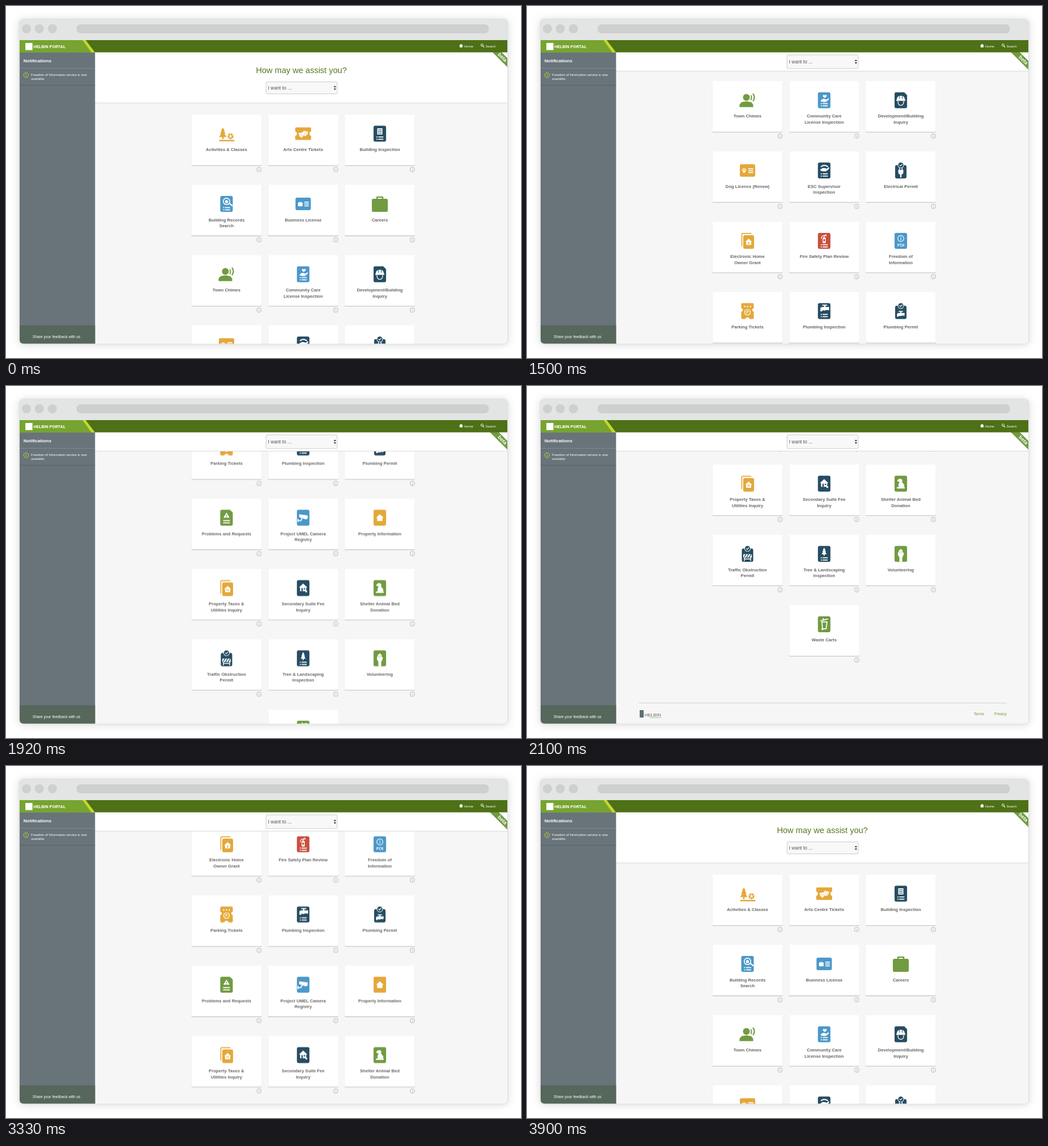
An HTML page that plays this animation: 905 by 619 pixels, repeating every 5.4 s.

```html
<!DOCTYPE html>
<html lang="en">
<head>
<meta charset="utf-8">
<title>Service portal</title>
<style>
  html, body { margin: 0; width: 100%; height: 100%; overflow: hidden; background: #fff; }
  svg { display: block; width: 905px; height: 619px; }
  text { font-family: "Liberation Sans", Arial, sans-serif; }
  .label { font-size: 7.65px; font-weight: bold; fill: #666; text-anchor: middle; }
  .window { filter: drop-shadow(0 1px 7px rgba(0, 0, 0, .13)); }
</style>
</head>
<body>
<svg id="stage" viewBox="0 0 905 619" xmlns="http://www.w3.org/2000/svg"></svg>
<script>
const YELLOW = '#e4a83a', NAVY = '#264d62', BLUE = '#4b98c9', GREEN = '#719b41', RED = '#c94f3e', WHITE = '#fff';

const rect = (x, y, w, h, fill, r = 0, more = '') =>
  `<rect x="${x}" y="${y}" width="${w}" height="${h}" rx="${r}" fill="${fill}" ${more}/>`;
const disc = (x, y, r, fill = WHITE) => `<circle cx="${x}" cy="${y}" r="${r}" fill="${fill}"/>`;
const ring = (x, y, r, color = WHITE, w = 1) =>
  `<circle cx="${x}" cy="${y}" r="${r}" fill="none" stroke="${color}" stroke-width="${w}"/>`;
const shape = (d, fill = WHITE) => `<path d="${d}" fill="${fill}"/>`;
const line = (d, w = 1, color = WHITE) =>
  `<path d="${d}" fill="none" stroke="${color}" stroke-width="${w}" stroke-linecap="round" stroke-linejoin="round"/>`;
const text = (x, y, size, fill, str, more = '') =>
  `<text x="${x}" y="${y}" font-size="${size}" fill="${fill}" ${more}>${str}</text>`;
const group = (x, y, body, scale = 1) => `<g transform="translate(${x} ${y}) scale(${scale})">${body}</g>`;

// Icon parts, centred on 0,0
const doc = c => rect(-11, -14, 22, 28, c, 3);
const cutDoc = c => shape('M-8-14H6L11-9V11Q11 14 8 14H-8Q-11 14-11 11V-11Q-11-14-8-14Z', c);
const wideDoc = c => rect(-13.5, -11, 27, 22, c, 3);
const doubleDoc = c => line('M-10 9V-11Q-10-13-8-13H6', 1.7, c) + rect(-7.5, -10, 19, 24, c, 3);
const clipboard = c => rect(-10, -9.5, 20, 23.5, c, 3) + disc(0, -9.5, 5.5, WHITE) +
  disc(0, -9.5, 4.6, c) + line('M-2-9.5L-.5-8L2.3-11', 1.2);
const list = (y = 6) => [y, y + 4].map(v => rect(-6, v, 2, 1.7, WHITE) + rect(-2.7, v, 9, 1.7, WHITE)).join('');
const house = (x, y, s = 1, mark = '') =>
  group(x, y, shape('M0-6.5L7 0H5V6H-5V0H-7Z') + mark, s);
const tree = c => shape('M0-11L3.5-5H2L5 0H3L6.5 6H1.3V10H-1.3V6H-6.5L-3 0H-5L-2-5H-3.5Z', c);
const hand = shape('M-7 1L-3-1.5L1-1L3 0L7-3V0L2 4H-3L-7 3Z');
const tap = shape('M-7 4V0Q-7-3-3.5-3H-1V-5H-4V-6.5H4V-5H1V-3H7V2H1.5Q0 3.5-2 2.5H-4V4Z');
const paw = disc(0, 1.5, 2) + disc(-2.6, -.8, 1) + disc(-.9, -2.3, 1) + disc(1.2, -2.3, 1) + disc(2.7, -.5, 1);
const briefcase = c => rect(-14, -9, 28, 23, c, 2.5) + line('M-5-9V-12H5V-9', 2.4, c);
const mask = c => shape('M-4-3.5Q0-1.5 4-3.5V1Q3 5 0 6Q-3 5-4 1Z') + disc(-1.7, .2, .7, c) +
  disc(1.7, .2, .7, c) + line('M-1.5 3Q0 4 1.5 3', .6, c);

const icons = {
  outing: group(-6.5, 0, tree(YELLOW), .98) + rect(-13, 11, 27, 2.5, YELLOW, 1) + disc(7, 4.5, 5.2, YELLOW) +
    shape('M7 2.4L9 4L8 6.3H6L5 4Z') + line('M7 2.4V0M9 4L11.5 3M5 4L2.7 3M8 6.3L9.5 8.5M6 6.3L4.5 8.5', .9),
  theatre: shape('M-12-11H12Q14-11 14-9V-4Q11-3 11 0Q11 3 14 4V9Q14 11 12 11H-12Q-14 11-14 9V4Q-11 3-11 0Q-11-3-14-4V-9Q-14-11-12-11Z', YELLOW) +
    `<g transform="translate(4 -1.5) rotate(12)">${mask(YELLOW)}</g><g transform="translate(-3.5 1) rotate(-10)">${mask(YELLOW)}</g>`,
  building: doc(NAVY) + rect(-4.5, -9.5, 9, 11, WHITE) +
    [-7.7, -4.7, -1.7].map(y => [-3, -.8, 1.4].map(x => rect(x, y, 1.5, 1.6, NAVY)).join('')).join('') + list(5),
  records: doc(BLUE) + line('M5-1L10 3', 2.4) + disc(0, -4.5, 6.5) + disc(0, -4.5, 4.9, BLUE) + house(0, -4.5, .48) + list(5.5),
  business: wideDoc(BLUE) + group(-5, 0, briefcase(WHITE), .29) + [-4, -.7, 2.6].map(y => rect(2, y, 8, 1.7, WHITE)).join(''),
  careers: briefcase(GREEN),
  voices: disc(-2, -5, 6, GREEN) + shape('M-14 12V8Q-12 2-2 2Q8 2 10 8V12Z', GREEN) +
    line('M6-8Q8-5 6-1', 2, GREEN) + line('M10-11Q14-5 10 1', 2.2, GREEN),
  care: doc(BLUE) + group(1, -1, hand) + shape('M1-4Q-4-7-1.5-9Q0-10 1-8Q2-10 4-9Q6-7 1-4Z') + list(5),
  helmet: cutDoc(NAVY) + shape('M-7-1Q-7-8 0-8Q7-8 7-1H8V1H-8V-1Z') + line('M-2.5-7V-3M2.5-7V-3', 1, NAVY) +
    line('M-5 2Q-5 9 0 9Q5 9 5 2', 1.3),
  dog: wideDoc(YELLOW) + group(-6, 0, paw, 1.15) + [-4, -.7, 2.6].map(y => rect(1.5, y, 8.5, 1.7, WHITE)).join(''),
  supervisor: doc(NAVY) + group(1, -3, hand, 1.1) + line('M-5-7Q0-11 6-7', 2) + list(5),
  plug: clipboard(NAVY) + shape('M-4.5-1H4.5V3Q4 7 1.2 7V12H-1.2V7Q-4 7-4.5 3Z') + line('M-2.3-1V-3.5M2.3-1V-3.5', 1.6),
  grant: doubleDoc(YELLOW) + house(2, 2, .88, text(0, 4.5, 7, YELLOW, '$', 'text-anchor="middle" font-weight="bold"')),
  fire: doc(RED) + rect(-2.7, -6, 5.5, 10, WHITE, 1.5) + rect(-1.4, -3, 2.8, 4, RED) +
    line('M-5-4Q-5-9 0-9H4M0-9V-6M0-9L3-11', 1.2) + list(6),
  foi: doc(BLUE) + ring(0, -4, 5.3, WHITE, 1.2) + disc(0, -6.3, .8) + rect(-.6, -4.7, 1.2, 3.7, WHITE) +
    text(0, 10, 7.5, WHITE, 'FOI', 'text-anchor="middle" font-weight="bold"'),
  parking: shape('M-9-14H9Q11-14 11-12V-5Q8-4 8-2Q8 0 11 1V12Q11 14 9 14H4Q3 11 0 11Q-3 11-4 14H-9Q-11 14-11 12V1Q-8 0-8-2Q-8-4-11-5V-12Q-11-14-9-14Z', YELLOW) +
    [-5, 0, 5].map(x => disc(x, -8, 1.2)).join('') + ring(0, 2, 5, WHITE, 1.2) +
    text(0, 4.5, 6.5, WHITE, 'P', 'text-anchor="middle" font-weight="bold"'),
  tapList: doc(NAVY) + group(1, -4, tap, 1.1) + list(5),
  tapPermit: clipboard(NAVY) + group(0, 6, tap, .95),
  problem: cutDoc(GREEN) + shape('M0-9L5.5 0H-5.5Z') + rect(-.6, -5.8, 1.2, 3, GREEN) + disc(0, -1.4, .7, GREEN) +
    rect(-6, 4, 12, 1.8, WHITE) + rect(-6, 8, 12, 1.8, WHITE),
  camera: doc(BLUE) + shape('M-7-6L8-4V1L5 3L-7-1Z') + line('M-2 1L-4 5H-9', 1.8) + rect(-10, 2, 1.8, 5.5, WHITE),
  property: doc(YELLOW) + house(0, 0, .95),
  taxes: doubleDoc(YELLOW) + house(2, 2, .88, text(0, 4, 5.5, YELLOW, '%', 'text-anchor="middle" font-weight="bold"')),
  suite: doc(NAVY) + house(0, -1, 1.08, rect(-2.8, 1, 2.2, 5, NAVY) + rect(1, 1, 2.2, 2.2, NAVY)) + rect(4, 4.5, 3, 3, WHITE),
  shelter: doc(GREEN) + shape('M-4-8L0-9L3-6L2-3L6 2V6H-4V1L-2-3L-6-4V-6Z') + rect(-7, 6, 14, 2.5, WHITE, 1),
  barrier: clipboard(NAVY) + rect(-7.5, .5, 15, 6, WHITE, 1) + line('M-6 6L-3 1M-1.5 6L1.5 1M3 6L6 1', 1.4, NAVY) +
    line('M-5.5 6V12M5.5 6V12M-5.5 9H5.5', 1.4),
  landscape: doc(NAVY) + group(0, -3.5, tree(WHITE), .68) + list(6),
  volunteer: doc(GREEN) + shape('M-5 2V-3H-3.6V-6.5H-1.5V-8.5H.8V-7H3V-3L5.5-1.5L4 4L2.5 6V14H-2.5V6Z') +
    line('M-2-4V-1M.5-5V-1', .5, GREEN),
  cart: doc(GREEN) + line('M-4-4L-3 8H3.5L5-4Z', 1.7) + line('M-6-6L6-9M-2-8L-1.5-10', 1.8) + disc(-3, 8.5, 1.8)
};

const rows = [
  [['outing', 'Activities &amp; Classes'], ['theatre', 'Arts Centre Tickets'], ['building', 'Building Inspection']],
  [['records', 'Building Records', 'Search'], ['business', 'Business License'], ['careers', 'Careers']],
  [['voices', 'Town Chimes'], ['care', 'Community Care', 'License Inspection'], ['helmet', 'Development/Building', 'Inquiry']],
  [['dog', 'Dog Licence (Renew)'], ['supervisor', 'ESC Supervisor', 'Inspection'], ['plug', 'Electrical Permit']],
  [['grant', 'Electronic Home', 'Owner Grant'], ['fire', 'Fire Safety Plan Review'], ['foi', 'Freedom of', 'Information']],
  [['parking', 'Parking Tickets'], ['tapList', 'Plumbing Inspection'], ['tapPermit', 'Plumbing Permit']],
  [['problem', 'Problems and Requests'], ['camera', 'Project UMEL Camera', 'Registry'], ['property', 'Property Information']],
  [['taxes', 'Property Taxes &amp;', 'Utilities Inquiry'], ['suite', 'Secondary Suite Fee', 'Inquiry'], ['shelter', 'Shelter Animal Bed', 'Donation']],
  [['barrier', 'Traffic Obstruction', 'Permit'], ['landscape', 'Tree &amp; Landscaping', 'Inspection'], ['volunteer', 'Volunteering']],
  [null, ['cart', 'Waste Carts']]
];

const info = (x, y, r, color, w) => ring(x, y, r, color, w) + disc(x, y - r * .45, w * .6, color) +
  rect(x - w * .45, y - r * .15, w * .9, r * .7, color);

function card([icon, ...lines]) {
  return rect(-61.7, 1, 123.4, 89.3, '#c9c9c9', 1.5) + rect(-61.7, 0, 123.4, 89, WHITE, 1.5) +
    group(0, 33.5, icons[icon]) +
    lines.map((s, i) => `<text class="label" x="0" y="${64 + i * 10.4}">${s}</text>`).join('') +
    info(57.2, 96.6, 4, '#aaa', .8);
}
const cards = rows.map((row, r) => row.map((item, c) =>
  item ? group(387.5 + c * 134.7, +(191 + r * 123.6).toFixed(1), card(item)) : '').join('')).join('');

const select = (y, h) => rect(457, y - h / 2, 125, h, '#f8f8f8', 2, 'stroke="#c8c8c8" stroke-width=".9"') +
  text(460.3, y + 3, 8.5, '#555', 'I want to ...') +
  shape(`M575.7 ${y - 1}h4.6l-2.3-3zM575.7 ${y + 1}h4.6l-2.3 3z`, '#444');

const ribbon = dy => group(0, dy, line('M840 63.2L900 123.2', 11, GREEN) +
  `<g transform="translate(872 95.2) rotate(45)">${text(0, 2.6, 9, WHITE, 'beta', 'text-anchor="middle" font-weight="bold"')}</g>`);

const page = rect(156, 81, 725, 89.5, WHITE) + rect(156, 170, 725, 1, '#dadada') +
  text(439.3, 117.8, 14.5, '#55791f', 'How may we assist you?') + select(144, 21) + ribbon(-4.7) + cards +
  rect(197, 1475, 646, 1, '#d2d2d2') + rect(198, 1488, 7, 13, '#5f6f70') +
  text(206.5, 1499, 8, '#5d6869', 'HELBIN') + rect(215, 1500.5, 21, 1, '#a9c36a') +
  text(785, 1497.3, 6.7, GREEN, 'Terms') + text(821, 1497.3, 6.7, GREEN, 'Privacy');

const sticky = rect(156, 81, 725, 33.5, WHITE) + rect(156, 114, 725, 1, '#dadada') + select(98, 24) + ribbon(0);

const chrome = `<g class="window">${rect(22, 22, 861, 573.5, '#e3e5e4', 9)}</g>` +
  [36, 58.5, 81.5].map(x => disc(x, 40, 8, '#cecfcf')).join('') + rect(124, 32.3, 724.5, 15.7, '#cecfcf', 7);

const topBar = rect(24, 60, 857, 21.5, '#4e7016') + shape('M24 60H135L151 81.5H24Z', '#76a42f') +
  shape('M134.5 60H140L156.3 81.5H150Z', '#c5d92d') + rect(34, 65, 12.5, 12.5, WHITE) +
  text(48.2, 73.8, 7.6, WHITE, 'HELBIN PORTAL', 'font-weight="bold" style="font-family:Roboto,sans-serif"') +
  house(799.7, 69.7, .5) + text(805, 72.8, 6, WHITE, 'Home') +
  ring(836.5, 68.8, 2, WHITE, 1) + line('M838 70.3L840 72.3', 1.1) + text(842.8, 72.8, 5.6, WHITE, 'Search');

const sidebar = rect(24, 81.5, 132.5, 513, '#69737a') + rect(24, 109, 132.5, .8, '#879096') +
  rect(24, 138.8, 132.5, .9, '#545e65') + text(30.7, 98.5, 8.1, WHITE, 'Notifications', 'font-weight="bold"') +
  info(35.3, 121.7, 4.2, '#c5d92d', 1) +
  text(44, 123, 5.8, WHITE, 'Freedom of Information service is now') + text(44, 130.4, 5.8, WHITE, 'available.') +
  rect(24, 561.5, 132.5, 33, '#56675b') + text(46.8, 583.7, 6.65, WHITE, 'Share your feedback with us');

document.getElementById('stage').innerHTML = `
  <defs>
    <clipPath id="screen"><path d="M24 60H881V587Q881 593.7 874 593.7H31Q24 593.7 24 587Z"/></clipPath>
    <clipPath id="view"><rect x="156" y="81" width="725" height="514"/></clipPath>
  </defs>
  ${chrome}
  <g clip-path="url(#screen)">
    ${rect(24, 60, 857, 535, '#f6f6f6')}
    <g clip-path="url(#view)"><g id="page">${page}</g><g id="sticky">${sticky}</g></g>
    ${sidebar}${topBar}
  </g>`;

// Rows of [time in ms, value, easing up to the next row]
const LOOP = 5400;
function play(id, property, table) {
  const frames = table.map(([time, value, easing = 'linear']) => ({ offset: time / LOOP, [property]: value, easing }));
  document.getElementById(id).animate(frames, { duration: LOOP, iterations: Infinity });
}
const top0 = 'translateY(0px)', bottom = 'translateY(-918px)';
play('page', 'transform', [
  [0, top0], [1199, top0, 'steps(30)'], [2099, bottom], [2999, bottom, 'steps(30)'], [3899, top0], [LOOP, top0]
]);
play('sticky', 'opacity', [
  [0, 0], [1199, 0, 'steps(3)'], [1289, 1], [3809, 1, 'steps(3)'], [3899, 0], [LOOP, 0]
]);
</script>
</body>
</html>
```
